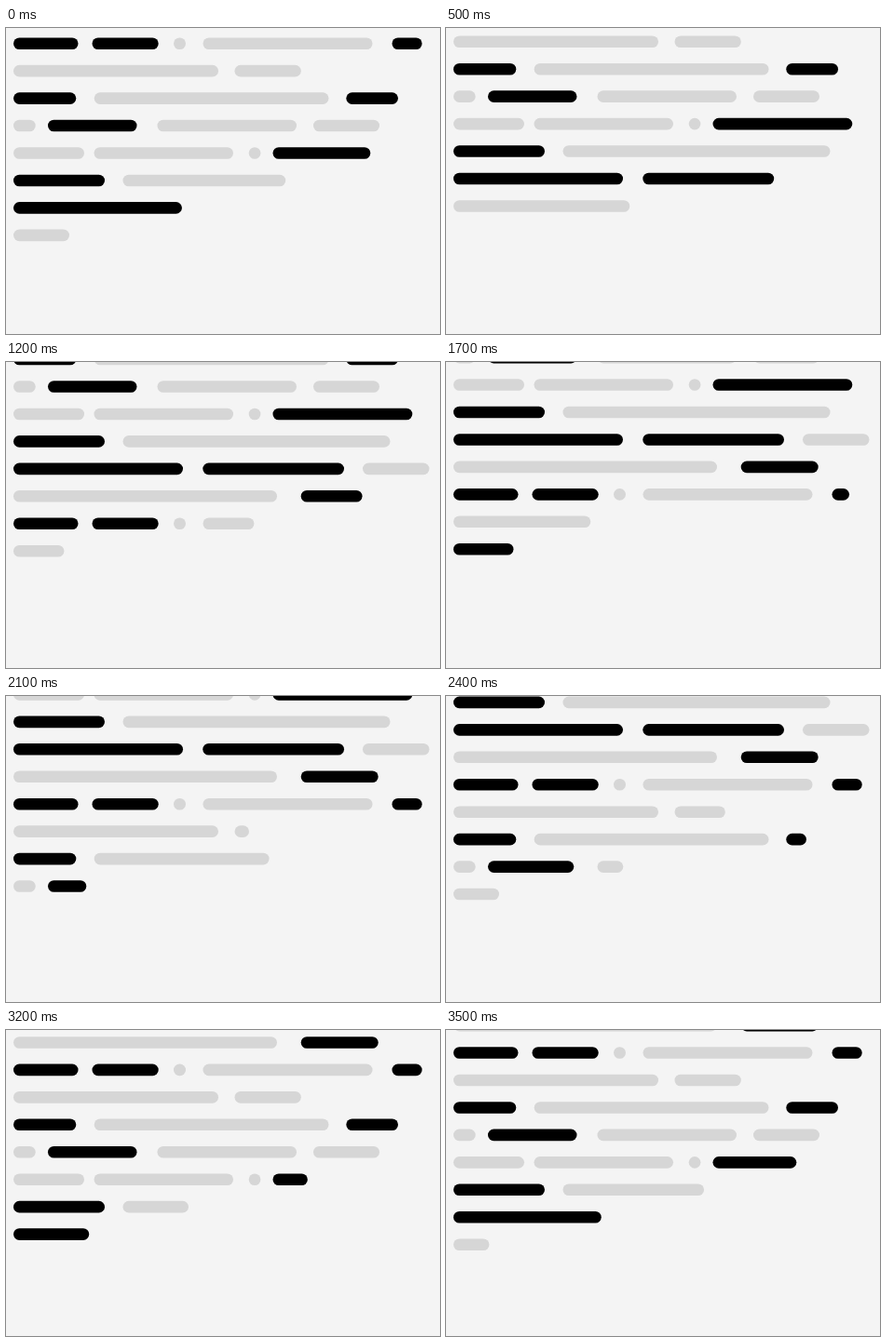
Animation, 466 px wide and 329 px high, one loop 3.6 s. Source, as an HTML page with a canvas:

```html
<!DOCTYPE html>
<html lang="en">
<head>
<meta charset="utf-8">
<title>Scrolling lines</title>
<style>
html, body { margin: 0; width: 100%; height: 100%; overflow: hidden; background: #f4f4f4; }
canvas { display: block; }
</style>
</head>
<body>
<canvas width="466" height="329"></canvas>
<script>
const ctx = document.querySelector('canvas').getContext('2d');
const LOOP = 3600, FRAMES = 90;
const PITCH = 29.45, TOP = 16.7, THICK = 12.6;

// A bar spans left..right and grows between the ages start..end (in 25 fps frames).
const bar = color => (left, right, start, end) => ({ color, left, right, start, end });
const ink = bar('#000'), pale = bar('#d6d6d6');

const rows = [
  [ink(8, 77.5, .6, 7), ink(92.5, 163.7, 7, 12.5), pale(180, 193, 12.5, 13), pale(211.5, 393.5, 13, 25), ink(414.5, 446.7, 25.5, 33.8)],
  [pale(8, 228, .6, 27.4), pale(245.5, 316.8, 27.4, 39.5)],
  [ink(8, 75.3, .6, 8.4), pale(94.7, 346.5, 8.4, 21.5), ink(365.3, 421, 21.5, 43)],
  [pale(8, 31.7, .6, 3.5), ink(45, 140.5, 3.5, 16.5), pale(162.5, 312, 15, 24), pale(330, 401, 23, 31.5)],
  [pale(8, 84, .6, 10), pale(94.5, 244, 10.3, 21.7), pale(260.7, 273.4, 21.7, 22.5), ink(286.5, 436.3, 22.7, 41)],
  [ink(8, 106, .6, 12), pale(125.5, 412.5, 11, 34.7)],
  [ink(8, 190, -.2, 15.1), ink(211.3, 363, 15.1, 28), pale(383, 454.5, 28, 34)],
  [pale(8, 291, .6, 25.7), ink(316.7, 399.7, 25.7, 38)]
];

function drawRow(row, y, age) {
  for (const { color, left, right, start, end } of row) {
    if (age <= start) continue;
    const grown = Math.min(1, (age - start) / (end - start));
    const x = left + THICK / 2;
    ctx.strokeStyle = color;
    ctx.beginPath();
    ctx.moveTo(x, y);
    ctx.lineTo(x + Math.max(.01, (right - left - THICK) * grown), y);
    ctx.stroke();
  }
}

function draw() {
  const step = Math.floor(performance.now() % LOOP / 100);
  const frame = Math.floor(step * 2.5);
  const scroll = frame / FRAMES * rows.length * PITCH;
  ctx.fillStyle = '#f4f4f4';
  ctx.fillRect(0, 0, 466, 329);
  ctx.lineWidth = THICK;
  ctx.lineCap = 'round';
  rows.forEach((row, i) => {
    const y = TOP + i * PITCH - scroll;
    const age = frame - 14 - i * 10;
    drawRow(row, y, age + FRAMES - 1);
    drawRow(row, y + rows.length * PITCH, age);
  });
  requestAnimationFrame(draw);
}
draw();
</script>
</body>
</html>
```
